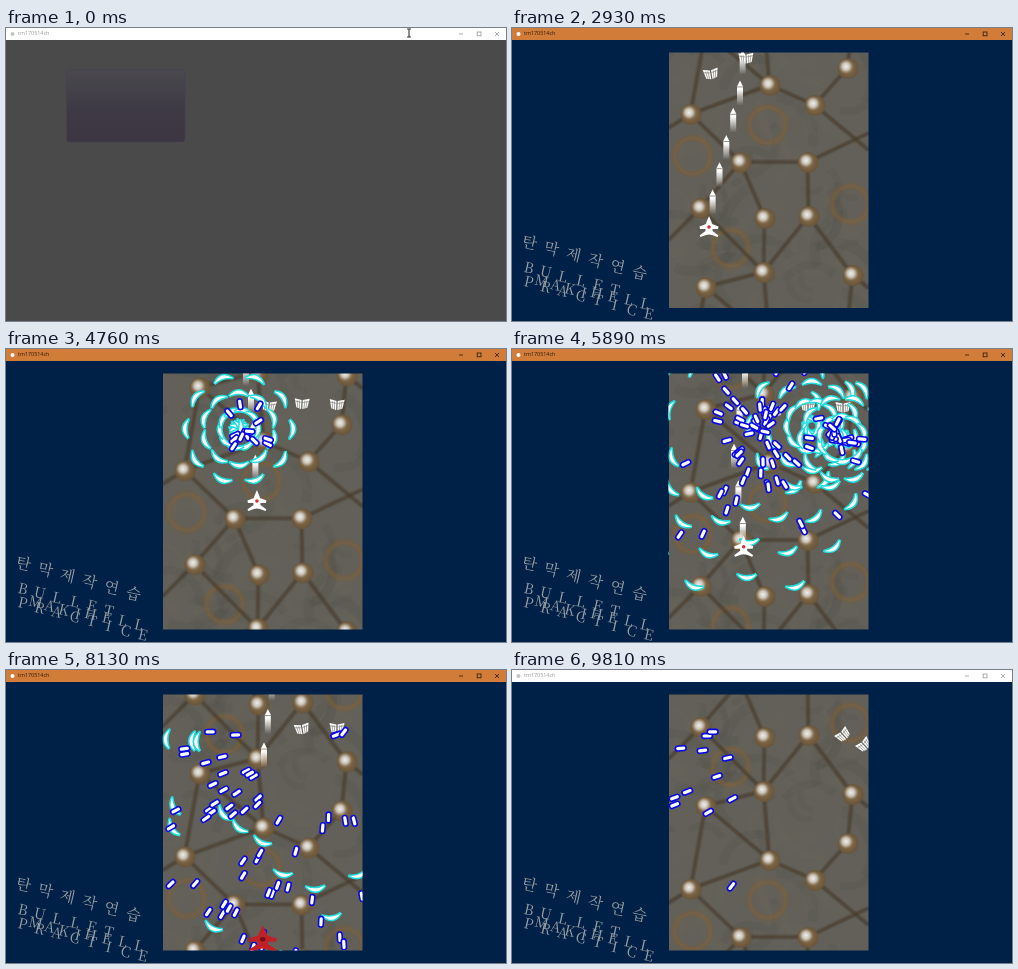
Animation, 500 px wide and 293 px high, one loop 9940 ms. Source, as an HTML page with a canvas:

```html
<!DOCTYPE html>
<html lang="en">
<head>
<meta charset="utf-8">
<title>Bullet practice</title>
<style>
html, body { margin: 0; width: 100%; height: 100%; overflow: hidden; background: #002147; }
#stage { position: relative; width: 500px; height: 293px; overflow: hidden; }
canvas { position: absolute; left: 0; top: 0; }
#title { position: absolute; left: 12px; top: 2px; font: 5.4px/7px "Open Sans", sans-serif; white-space: nowrap; }
#sign span { position: absolute; width: 24px; height: 24px; margin: -12px; text-align: center;
  line-height: 24px; color: #9a9fa3; font-family: "Noto Serif CJK KR", "Noto Serif", "Noto Sans CJK KR", serif; transform: rotate(13deg); }
</style>
</head>
<body>
<div id="stage">
  <canvas id="view" width="500" height="293"></canvas>
  <div id="sign"></div>
  <div id="title">tm170514ch</div>
</div>
<script>
const LOOP = 9940, STEP = 140.4, TAU = Math.PI * 2;
const FIELD = { x: 156.5, y: 24.5, w: 200, h: 256 };
const g = document.getElementById('view').getContext('2d');
const sign = document.getElementById('sign');
const title = document.getElementById('title');

let seed = 7;
const rnd = () => (seed = (seed * 16807) % 2147483647) / 2147483647;
const clamp = v => Math.max(0, Math.min(1, v));
const easeOut = v => 1 - (1 - clamp(v)) ** 2;

// Interpolates rows of [time, x, y]; null outside the rows
function along(rows, t) {
  if (t < rows[0][0]) return null;
  for (let i = 1; i < rows.length; i++) {
    const [t0, x0, y0] = rows[i - 1], [t1, x1, y1] = rows[i];
    const k = (t - t0) / (t1 - t0);
    if (t <= t1) return [x0 + (x1 - x0) * k, y0 + (y1 - y0) * k];
  }
  return null;
}

// Lettering
function letters(str, x, y, dx, dy, size = 14.5) {
  [...str].forEach((ch, i) => {
    const s = document.createElement('span');
    s.textContent = ch;
    s.style.cssText = `left:${x + dx * i}px;top:${y + dy * i}px;font-size:${size}px`;
    sign.append(s);
  });
}
letters('탄막제작연습', 18, 213, 22, 6, 15.5);
letters('BULLET', 17, 239, 17.2, 4.3);
letters('HELL', 85, 264, 16, 3.6);
letters('MAKI', 30, 252, 14, 4);
letters('PRACTICE', 17, 253, 17.2, 4.6);

// Scrolling floor, one tile high as the field
const NODES = { A: [101, 33], B: [179, 16], C: [146, 53], D: [22, 62], E: [72, 110], F: [139, 110],
  G: [32, 156], H: [96, 166], I: [140, 164], J: [37, 235], K: [95, 220], L: [184, 223] };
const LINKS = 'AC AD BC DE EF EG FI EH HK IK IL GK JK'.split(' ');
const WRAPS = 'KA JA JD LB'.split(' ');   // first node joins from the tile above
const EXITS = { C: [200, 98], F: [200, 81], D: [0, 76], G: [0, 188], L: [200, 236] };
const tile = document.createElement('canvas');
tile.width = FIELD.w; tile.height = FIELD.h;

function paintTile() {
  const c = tile.getContext('2d');
  const each = fn => [-256, 0, 256].forEach(dy => { c.save(); c.translate(0, dy); fn(); c.restore(); });
  const arc = (x, y, r, w, col, a = 0, b = TAU) => {
    c.strokeStyle = col; c.lineWidth = w;
    c.beginPath(); c.arc(x, y, r, a, b); c.stroke();
  };
  const ball = (x, y, r, fx, fy, ...stops) => {
    const tone = c.createRadialGradient(fx, fy, 0, x, y, r);
    stops.forEach((col, i) => tone.addColorStop(i / (stops.length - 1), col));
    c.fillStyle = tone;
    c.beginPath(); c.arc(x, y, r, 0, TAU); c.fill();
  };
  const beam = (x1, y1, x2, y2) => {
    for (const [w, col] of [[5.5, 'rgba(76,66,52,.28)'], [3, 'rgba(70,56,40,.5)']]) {
      c.strokeStyle = col; c.lineWidth = w;
      c.beginPath(); c.moveTo(x1, y1); c.lineTo(x2, y2); c.stroke();
    }
  };

  c.fillStyle = '#626058';
  c.fillRect(0, 0, 200, 256);
  for (let i = 0; i < 70; i++) {
    const x = rnd() * 200, y = rnd() * 256, r = 12 + rnd() * 35, a = rnd() * TAU;
    const col = rnd() < .5 ? 'rgba(125,119,105,.07)' : 'rgba(60,58,56,.08)';
    each(() => arc(x, y, r, 3 + r / 6, col, a, a + 1.8));
  }
  each(() => {
    for (const [x, y] of [[99, 73], [24, 104], [182, 152], [62, 196]]) {
      arc(x, y, 18, 7, 'rgba(125,94,55,.28)');
      arc(x, y, 18, 3, 'rgba(135,98,54,.35)');
    }
  });
  each(() => {
    for (const [a, b] of LINKS) beam(...NODES[a], ...NODES[b]);
    for (const [a, b] of WRAPS) beam(NODES[a][0], NODES[a][1] - 256, ...NODES[b]);
    for (const k in EXITS) beam(...NODES[k], ...EXITS[k]);
  });
  each(() => {
    for (const [x, y] of Object.values(NODES)) {
      ball(x + .5, y + .5, 10.5, x - 2, y - 2, '#a08f76', '#806848', '#68543a');
      ball(x - 1.5, y - 1.5, 7.5, x - 1.5, y - 1.5, '#f0efec', 'rgba(214,210,202,.85)', 'rgba(170,155,135,0)');
    }
  });
}
paintTile();

// Actors
const SHIP = [[650, 256, 250], [2250, 228, 225], [2930, 197, 199], [4350, 245, 152], [4760, 251, 152],
  [5550, 222, 190], [5890, 232, 198], [6450, 255, 228], [7000, 267, 265], [7350, 258, 266], [8545, 256, 271]];
const LAST_SHOT = 7350, HIT = 7850;
const CURSOR_IN = [[0, 403, 5], [180, 290, 35], [350, 158, 67], [649, 158, 67]];
const CURSOR_OUT = [[9200, 440, 60], [9530, 491, 6], [9660, 491, 6]];
// Arrival, departure and hovering place
const ENEMIES = [[2600, 3600, 199, 50], [2700, 3600, 234, 35], [3900, 5200, 233, 80], [4350, 7300, 263, 62],
  [4300, 8900, 296, 57], [4300, 10200, 331, 58], [8900, 10200, 352, 68]];

const bullets = [];
const shoot = (kind, t0, x, y, angle, speed) => bullets.push({ kind, t0, x, y, angle, speed });

function rings(n, x, y, from, to, speed) {
  for (let t = from, k = 0; t <= to; t += 175, k++)
    for (let i = 0; i < n; i++) shoot('moon', t, x, y, k * .3 + i * TAU / n, speed);
}
function spray(kind, n, x, y, from, to, speed, a0 = 0, a1 = TAU) {
  for (let i = 0; i < n; i++)
    shoot(kind, from + (to - from) * rnd(), x, y, a0 + (a1 - a0) * rnd(), speed);
}

rings(10, 233, 80, 4220, 5200, 100);
rings(10, 300, 77, 5300, 5850, 110);
rings(10, 330, 90, 5500, 5850, 110);
spray('moon', 24, 300, 70, 5900, 6800, 100);
spray('moon', 5, 300, 70, 6800, 7100, 100, 1.2, 3.2);
spray('pill', 14, 238, 82, 4450, 4760, 95);
spray('pill', 16, 240, 82, 4760, 5290, 95);
spray('pill', 46, 250, 82, 5290, 5850, 100);
spray('pill', 10, 328, 92, 5650, 5890, 100);
spray('pill', 40, 322, 80, 5800, 6300, 115);
spray('pill', 30, 318, 85, 6300, 6900, 115, -1.6, 1);
spray('pill', 62, 325, 60, 6150, 7400, 115, 1.3, 3.25);
spray('pill', 14, 338, 62, 8050, 8750, 115, 2.2, 3.3);

// Shapes
function at(x, y, angle, fn) {
  g.save(); g.translate(x, y); g.rotate(angle); fn(); g.restore();
}
function poly(points) {
  g.beginPath();
  points.forEach(([x, y]) => g.lineTo(x, y));
  g.closePath();
}
function stroke(col, width, ...lines) {
  g.strokeStyle = col; g.lineWidth = width;
  g.beginPath();
  for (const [x1, y1, x2, y2] of lines) { g.moveTo(x1, y1); g.lineTo(x2, y2); }
  g.stroke();
}
const mirror = half => half.concat(half.slice().reverse().map(([x, y]) => [-x, y]));
const HULL = mirror([[0, -11], [2.5, -5], [3, -3], [9.5, -.5], [9, 2], [3.5, 2], [3.5, 4], [9.5, 8.5], [8.5, 10], [3, 8], [0, 7.5]]);

function ship(x, y, hit) {
  at(x, y, 0, () => {
    if (hit) g.scale(1.5, 1.25);
    poly(HULL);
    g.fillStyle = hit ? '#c02026' : '#fff';
    g.fill();
    g.fillStyle = hit ? '#701015' : '#d8303a';
    g.beginPath(); g.arc(0, 0, 1.8, 0, TAU); g.fill();
  });
}
function enemy(t, [from, to, x, y]) {
  if (t < from || t > to) return;
  const come = easeOut((t - from) / 600), go = clamp((t - to + 900) / 900);
  at(x, 14 + (y - 14) * come + 12 * go, .8 * (1 - come) - 1.3 * go, () => {
    for (const s of [-1, 1]) {
      poly([[s * .6, -3.5], [s * 7.5, -5], [s * 5.5, 4], [s * .6, 5.5]]);
      g.fillStyle = '#fff'; g.fill();
      stroke('#77736b', .6, [s * 2.8, -3, s * 2.2, 5], [s * 5, -3, s * 4, 4.5], [s * .6, -1, s * 7, -2.2]);
    }
  });
}
function laser(x, y) {
  const fade = g.createLinearGradient(0, y, 0, y + 25);
  fade.addColorStop(.35, '#fff'); fade.addColorStop(1, 'rgba(255,255,255,0)');
  g.fillStyle = fade;
  poly([[x, y], [x + 3, y + 6], [x + 3, y + 25], [x - 3, y + 25], [x - 3, y + 6]]);
  g.fill();
  g.fillStyle = '#6b675f';
  g.fillRect(x - 3, y + 6.2, 6, .7);
}
const draw = {
  pill() {
    g.lineCap = 'round';
    stroke('#0808e6', 6.4, [-3, 0, 3, 0]);
    stroke('#fff', 3.2, [-3, 0, 3, 0]);
  },
  moon() {
    g.beginPath();
    g.moveTo(-3, -9.5); g.quadraticCurveTo(8, 0, -3, 9.5); g.quadraticCurveTo(1.5, 0, -3, -9.5);
    g.lineJoin = 'round';
    g.strokeStyle = '#1fdcde'; g.lineWidth = 3; g.stroke();
    g.fillStyle = '#fff'; g.fill();
  }
};

function field(t) {
  g.save();
  g.beginPath(); g.rect(FIELD.x, FIELD.y, FIELD.w, FIELD.h); g.clip();
  const off = ((19.33 * (t - 2930) / 1000) % 256 + 256) % 256;
  g.drawImage(tile, FIELD.x, FIELD.y + off - .5);
  g.drawImage(tile, FIELD.x, FIELD.y + off - 256.5);

  for (let t0 = 1500; t0 <= Math.min(t, LAST_SHOT); t0 += 150) {
    const [x, y] = along(SHIP, t0);
    laser(x, y - 23 - .22 * (t - t0));
  }
  for (const e of ENEMIES) enemy(t, e);
  for (const b of bullets) {
    const r = b.speed * (t - b.t0) / 1000;
    if (r >= 0 && r < 340) at(b.x + r * Math.cos(b.angle), b.y + r * Math.sin(b.angle), b.angle, draw[b.kind]);
  }
  const p = along(SHIP, t);
  if (p) ship(...p, t >= HIT);
  g.restore();
}

function dialog() {
  const tone = g.createLinearGradient(0, 42, 0, 114);
  tone.addColorStop(0, '#4a494e'); tone.addColorStop(.55, '#3e3a45'); tone.addColorStop(1, '#3c3643');
  g.fillStyle = tone;
  g.beginPath(); g.roundRect(60.5, 42, 118.5, 72, 3); g.fill();
  g.strokeStyle = 'rgba(70,64,82,.7)'; g.lineWidth = 1; g.stroke();
}

function bar(active) {
  g.fillStyle = active ? '#d17c38' : '#fff';
  g.fillRect(0, 0, 500, 12);
  const ink = active ? '#2c1a0c' : '#999';
  title.style.color = ink;
  g.fillStyle = active ? '#fff' : '#c4c4c4';
  g.beginPath(); g.arc(6.5, 6, 2, 0, TAU); g.fill();
  g.lineCap = 'butt';
  stroke(ink, .8, [453, 6, 457, 6], [489, 4, 493, 8], [493, 4, 489, 8]);
  g.strokeRect(471.2, 4, 3.8, 3.8);
}

function cursor(x, y) {
  g.lineCap = 'butt';
  for (const [col, w] of [['#fff', 2.6], ['#333', 1.1]])
    stroke(col, w, [x - 2, y - 4, x + 2, y - 4], [x, y - 4, x, y + 4], [x - 2, y + 4, x + 2, y + 4]);
}

function render(t) {
  const shown = t < 600 ? 0 : clamp((t - 500) / 600);
  g.fillStyle = '#002147';
  g.fillRect(0, 0, 500, 293);
  if (shown) field(t);
  if (shown < 1) {
    g.globalAlpha = 1 - shown;
    g.fillStyle = '#4a4a4a';
    g.fillRect(0, 12, 500, 281);
    dialog();
    g.globalAlpha = 1;
  }
  sign.style.opacity = shown;
  bar(t >= 600 && t < 9665);
  const c = along(CURSOR_IN, t) || along(CURSOR_OUT, t);
  if (c) cursor(...c);
}

// The opening holds three poses, then play runs in even steps
function stepped(now) {
  if (now < 650) return now < 180 ? 0 : now < 350 ? 180 : 350;
  return 2930 + STEP * Math.floor((now - 2930) / STEP + .02);
}

const start = performance.now();
let last = -1;
function loop() {
  const t = stepped((performance.now() - start) % LOOP);
  if (t !== last) render(last = t);
  requestAnimationFrame(loop);
}
loop();
</script>
</body>
</html>
```
